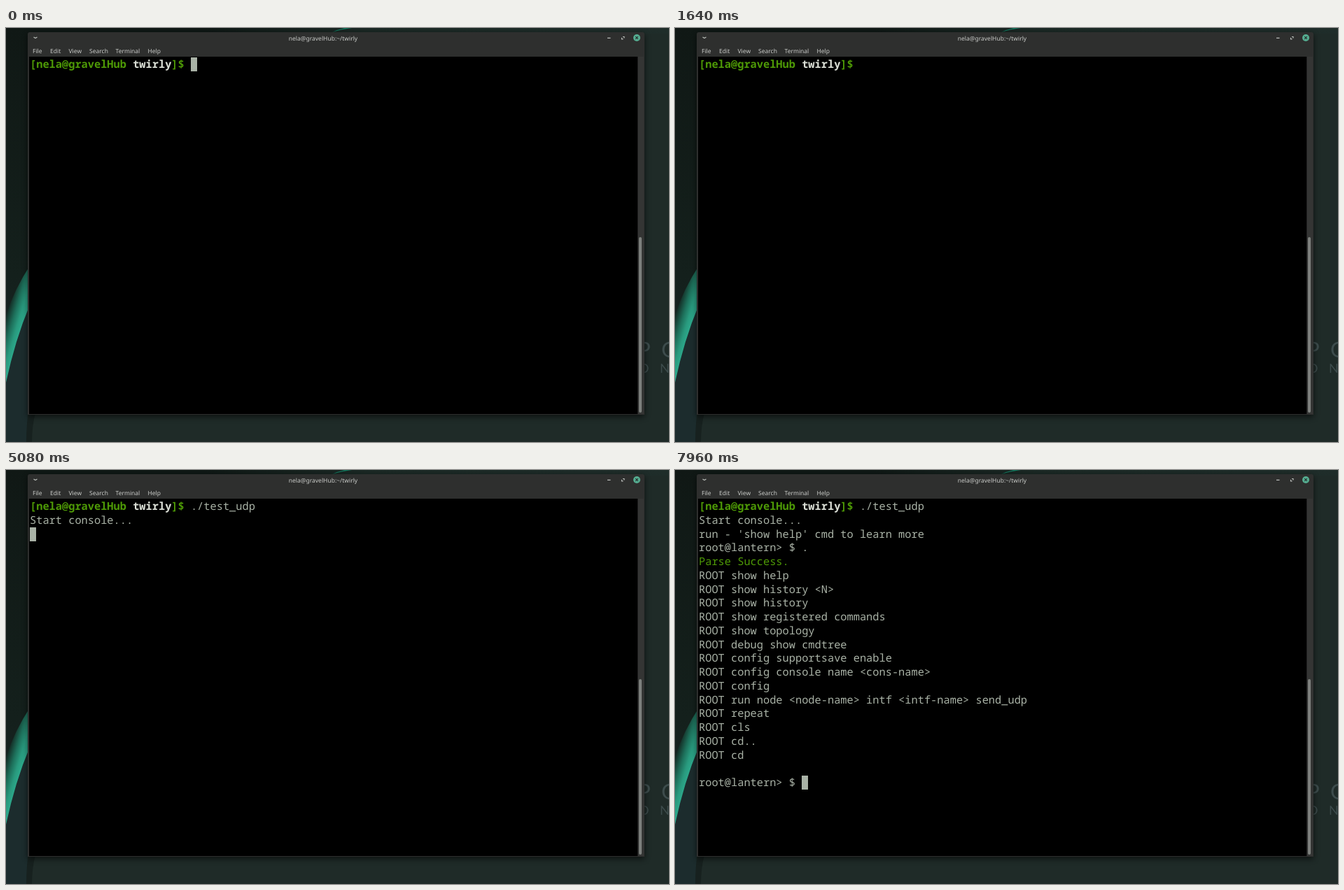
These frames come from a looping animation (947 by 592 pixels, 8 s). An HTML page:

```html
<!DOCTYPE html>
<html lang="en">
<head>
<meta charset="utf-8">
<title>Terminal session</title>
<style>
  html, body { margin: 0; width: 100%; height: 100%; overflow: hidden; background: #1f2b28; }
  svg { display: block; width: 947px; height: 592px; }
  text { white-space: pre; text-rendering: geometricPrecision; }
  .ui { font: 8.5px "Noto Sans", sans-serif; fill: #c9cbc8; }
  .wall { font-family: Lato, sans-serif; fill: #3d4c4c; }
  .term { font: 15.333px "Noto Sans Mono", monospace; fill: #a9b2a6; }
  .prompt { font-weight: bold; fill: #4e9a06; }
  .icon { fill: none; stroke: #b9bcb9; stroke-width: 1.2; }
</style>
</head>
<body>
<svg viewBox="0 0 947 592">
  <defs>
    <linearGradient id="left" x2="0" y2="1">
      <stop stop-color="#101815"/><stop offset=".6" stop-color="#14201c"/><stop offset="1" stop-color="#1d2a2a"/>
    </linearGradient>
    <linearGradient id="sky">
      <stop offset=".3" stop-color="#0f1815"/><stop offset=".55" stop-color="#1b2925"/><stop offset="1" stop-color="#1f2d2a"/>
    </linearGradient>
    <linearGradient id="arc" gradientUnits="userSpaceOnUse" x1="0" y1="410" x2="27" y2="418">
      <stop stop-color="#13251f"/><stop offset=".4" stop-color="#1d6f5a"/>
      <stop offset=".7" stop-color="#299a7e"/><stop offset="1" stop-color="#2eae90"/>
    </linearGradient>
    <filter id="blur" x="-10%" y="-10%" width="120%" height="120%"><feGaussianBlur stdDeviation="4"/></filter>
  </defs>

  <!-- wallpaper -->
  <rect width="947" height="592" fill="#1f2b28"/>
  <rect width="947" height="8" fill="url(#sky)"/>
  <rect width="32" height="592" fill="url(#left)"/>
  <path d="M466 6Q478 2 494 0H484Q474 2 466 6Z" fill="#127a60"/>
  <path d="M0 507Q14 440 34 396L34 592H0Z" fill="#1c2c2d"/>
  <path d="M0 410Q13 372 34 340V396Q13 446 0 507Z" fill="url(#arc)"/>
  <path d="M33 540Q29 566 29 592H37Q37 570 42 550Z" fill="#17211f"/>
  <g class="wall">
    <text x="902" y="471" font-size="31">P</text><text x="936" y="471" font-size="31">G</text>
    <text x="904" y="493" font-size="18">O</text><text x="934" y="493" font-size="18">N</text>
  </g>

  <!-- window -->
  <rect x="31" y="9" width="881" height="547" fill="#000" opacity=".6" filter="url(#blur)"/>
  <path d="M31 553V9Q31 6 34 6H909Q912 6 912 9V553Z" fill="#2e2f2e"/>
  <rect x="33" y="41" width="869.5" height="511" fill="#000"/>
  <rect x="902.5" y="41" width="8.5" height="511" fill="#343534"/>
  <rect x="904" y="299" width="4" height="251" rx="2" fill="#7d807d"/>
  <g class="ui">
    <text x="453" y="18" text-anchor="middle">nela@gravelHub:~/twirly</text>
    <text x="38" y="35.5">File</text><text x="63" y="35.5">Edit</text>
    <text x="89.5" y="35.5">View</text><text x="119" y="35.5">Search</text>
    <text x="156.5" y="35.5">Terminal</text><text x="202.5" y="35.5">Help</text>
  </g>
  <path class="icon" d="M39.5 13L42 14.5L44.5 13M859 14.3H863.5M881 12.5H883V14.5M879.5 13.8V15.8H881.5"/>
  <circle cx="901" cy="14" r="5" fill="#55ad91"/>
  <path d="M899.2 12.2L902.8 15.8M902.8 12.2L899.2 15.8" stroke="#24312d" stroke-width="1.2"/>

  <!-- terminal -->
  <text class="term prompt" x="34" y="57">[nela@gravelHub <tspan fill="#dde1d8">twirly</tspan>]$</text>
  <g id="rows" class="term"></g>
  <rect id="cursor" width="9" height="20" fill="#a9b2a6"/>
</svg>
<script>
const LOOP = 8000, BLINK = 600, LEFT = 34, CHAR = 9.2, LINE = 19.75, ROWS = 21;
const shell = "root@lantern> $ ";
const help = [
  "show help", "show history <N>", "show history", "show registered commands",
  "show topology", "debug show cmdtree", "config supportsave enable",
  "config console name <cons-name>", "config",
  "run node <node-name> intf <intf-name> send_udp", "repeat", "cls", "cd..", "cd"
].map(cmd => "ROOT " + cmd + "\n").join("");

// [time, text added to the screen]; each step restarts the cursor blink
const steps = [
  [-360, " ".repeat(25)],
  [2240, "."], [2400, "/"], [2560, "t"], [2680, "e"], [2800, "s"], [3000, "t_udp "],
  [3720, "\nStart console...\n"],
  [5720, "run - 'show help' cmd to learn more\n" + shell],
  [6080, "."],
  [6440, "\nParse Success.\n" + help + "\n" + shell]
];

const cursor = document.getElementById("cursor");
const rows = Array.from({ length: ROWS }, (_, i) => {
  const row = document.createElementNS("http://www.w3.org/2000/svg", "text");
  row.setAttribute("x", LEFT);
  row.setAttribute("y", 57 + i * LINE);
  return document.getElementById("rows").appendChild(row);
});

let shown = 0;
function draw(now) {
  const t = now % LOOP;
  const done = steps.filter(([at]) => at <= t);
  const lines = done.map(([, text]) => text).join("").split("\n");
  if (shown !== done.length) {
    shown = done.length;
    rows.forEach((row, i) => {
      row.textContent = lines[i] || "";
      row.style.fill = row.textContent.startsWith("Parse") ? "#4e9a06" : "";
    });
    cursor.setAttribute("x", Math.round(LEFT + lines.at(-1).length * CHAR));
    cursor.setAttribute("y", Math.round(42 + (lines.length - 1) * LINE));
  }
  const idle = t - done.at(-1)[0];
  cursor.style.opacity = Math.floor(idle / BLINK) % 2 ? 0 : 1;
}

const start = performance.now();
function frame() {
  draw(performance.now() - start);
  requestAnimationFrame(frame);
}
frame();
</script>
</body>
</html>
```
